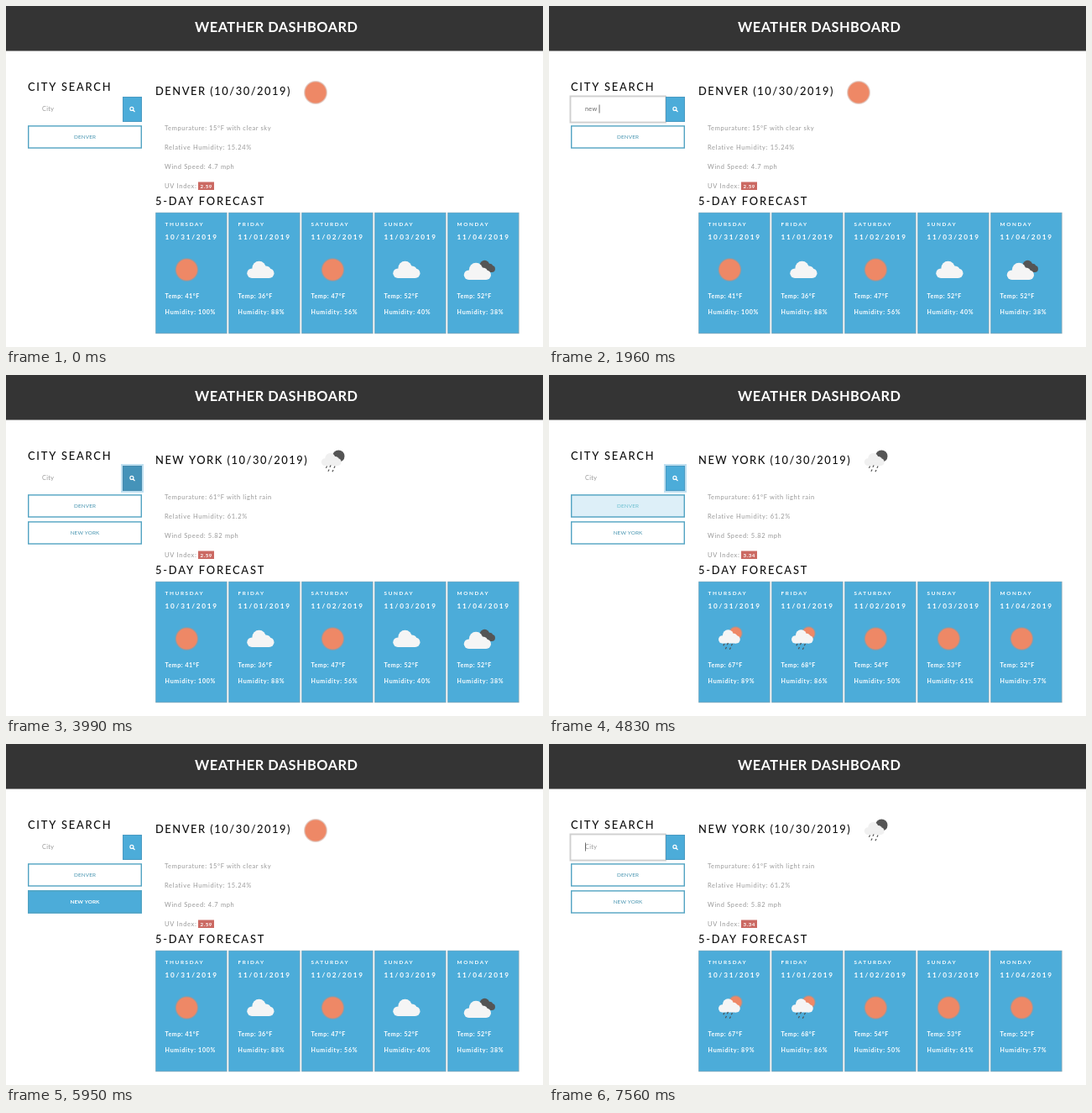
Animation, 640 px wide and 406 px high, one loop 7.84 s. Source, as an HTML page with a canvas:

```html
<!DOCTYPE html>
<html lang="en">
<head>
<meta charset="utf-8">
<title>Weather Dashboard</title>
<style>
html, body { margin: 0; width: 100%; height: 100%; overflow: hidden; background: #fff; }
canvas { display: block; width: 640px; height: 406px; }
</style>
</head>
<body>
<canvas id="stage"></canvas>
<script>
const W = 640, H = 406, LOOP = 7840;
const BLUE = '#4cacd9', LINE = '#52a3c2', CLOUD = '#f5f5f5', DARK = '#555';
const SUN = '#ee8866', SUN_CLEAR = 'rgba(170,140,130,0)';
const canvas = document.getElementById('stage');
const ctx = canvas.getContext('2d');
const dpr = window.devicePixelRatio || 1;
canvas.width = W * dpr;
canvas.height = H * dpr;
ctx.scale(dpr, dpr);

const DAYS = ['THURSDAY', 'FRIDAY', 'SATURDAY', 'SUNDAY', 'MONDAY'];
const CITIES = {
  denver: {
    title: 'DENVER (10/30/2019)', icon: 'sun', iconX: 369, uv: '2.59',
    lines: ['Tempurature: 15°F with clear sky', 'Relative Humidity: 15.24%', 'Wind Speed: 4.7 mph'],
    icons: ['sun', 'cloud', 'sun', 'cloud', 'broken'],
    temps: [41, 36, 47, 52, 52], humidity: [100, 88, 56, 40, 38]
  },
  newYork: {
    title: 'NEW YORK (10/30/2019)', icon: 'rain', iconX: 390, uv: '3.34',
    lines: ['Tempurature: 61°F with light rain', 'Relative Humidity: 61.2%', 'Wind Speed: 5.82 mph'],
    icons: ['sunRain', 'sunRain', 'sun', 'sun', 'sun'],
    temps: [67, 68, 54, 53, 52], humidity: [89, 86, 50, 61, 57]
  }
};

const QUERY = 'new york';
const KEYS = [1610, 1750, 1820, 1960, 2170, 2310, 2380, 2520];
const FOCUS = [[400, 3500], [6510, LOOP]];

const within = (t, a, b) => t >= a && t < b;
const ramp = (t, start, dur) => Math.min(1, Math.max(0, (t - start) / dur));
const pulse = (t, a, da, b, db) => ramp(t, a, da) - ramp(t, b, db);

function text(str, x, y, size, color, spacing = 0, weight = 400, align = 'left') {
  ctx.font = `${weight} ${size}px Lato, "Open Sans", sans-serif`;
  ctx.letterSpacing = spacing + 'px';
  ctx.textAlign = align;
  ctx.fillStyle = color;
  ctx.fillText(str, x, y);
  return ctx.measureText(str).width;
}

const heading = (str, x, y, spacing) => text(str, x, y, 12.9, '#111', spacing, 500);

function box(x, y, w, h, color) {
  ctx.fillStyle = color;
  ctx.fillRect(x, y, w, h);
}

function outline(x, y, w, h, color, width) {
  ctx.strokeStyle = color;
  ctx.lineWidth = width;
  ctx.strokeRect(x + width / 2, y + width / 2, w - width, h - width);
}

function disc(x, y, r, color) {
  ctx.fillStyle = color;
  ctx.beginPath();
  ctx.arc(x, y, r, 0, 7);
  ctx.fill();
}

function sun(x, y, r) {
  const glow = ctx.createRadialGradient(x, y, r - 1, x, y, r + 1.5);
  glow.addColorStop(0, SUN);
  glow.addColorStop(1, SUN_CLEAR);
  disc(x, y, r + 1.5, glow);
}

function cloud(x, y, s, color) {
  disc(x - 10.3 * s, y + 4.2 * s, 5.8 * s, color);
  disc(x - 1.8 * s, y - 2 * s, 8.2 * s, color);
  disc(x + 6.5 * s, y + 1.2 * s, 5.8 * s, color);
  disc(x + 10.3 * s, y + 4.2 * s, 5.8 * s, color);
  box(x - 10.3 * s, y + 3 * s, 20.6 * s, 7 * s, color);
}

function drops(x, y) {
  ctx.strokeStyle = '#505050';
  ctx.lineWidth = 1.2;
  ctx.beginPath();
  for (const [dx, dy] of [[-5, 1], [-.5, 0], [4.5, 1], [-2.5, 5], [2.5, 5.5]]) {
    ctx.moveTo(x + dx + .6, y + dy);
    ctx.lineTo(x + dx - .6, y + dy + 2.3);
  }
  ctx.stroke();
}

const ICONS = {
  sun(x, y) { sun(x, y, 13); },
  cloud(x, y) { cloud(x + 1, y, 1, CLOUD); },
  broken(x, y) {
    cloud(x + 8.3, y - 4, .7, DARK);
    cloud(x - 1.5, y + 2, 1, CLOUD);
  },
  rain(x, y) {
    disc(x + 6.3, y - 6.3, 7.2, DARK);
    cloud(x - 2.3, y - 2.5, .74, '#f0f0f0');
    drops(x - 3, y + 4.5);
  },
  sunRain(x, y) {
    sun(x + 7, y - 6.5, 7.5);
    cloud(x - .5, y - 2.5, .8, CLOUD);
    drops(x - 2, y + 5);
  }
};

function cityButton(label, y, fill, halo) {
  if (halo) box(24, y - 2, 140, 31.5, '#bfdff0');
  box(26, y, 136, 27.5, '#fff');
  ctx.globalAlpha = fill;
  box(26, y, 136, 27.5, BLUE);
  ctx.globalAlpha = 1;
  outline(26, y, 136, 27.5, LINE, 1.4);
  text(label, 94, y + 16, 6.4, fill > .5 ? '#fff' : fill > 0 ? '#6cbfd0' : '#4794b0',
    .1, fill > .5 ? 700 : 400, 'center');
}

function search(t) {
  const focus = FOCUS.find(([a, b]) => within(t, a, b));
  heading('CITY SEARCH', 26, 101.1, 1.75);

  if (focus) {
    ctx.globalAlpha = ramp(t, focus[0], 140);
    box(24.5, 106.5, 115.5, 33, '#cfcfcf');
    box(26.4, 108.4, 112, 29.2, '#fff');
    ctx.globalAlpha = 1;
  }

  const typed = t < 3640 ? QUERY.slice(0, KEYS.filter(k => k <= t).length) : '';
  const width = text(typed || 'City', 43, 125, 7.3, typed ? '#666' : '#999', .3);
  if (focus) {
    const last = Math.max(focus[0], ...KEYS.filter(k => k <= t && focus[0] < k));
    if ((t - last) % 1000 < 500) box(typed ? 43 + width : 43, 117.5, .7, 10, '#333');
  }

  if (within(t, 3500, 5250)) box(137, 106, 27, 34, '#bfdff0');
  box(139, 108, 23, 30, BLUE);
  ctx.globalAlpha = pulse(t, 3430, 150, 4270, 150);
  box(139, 108, 23, 30, '#4593b9');
  ctx.globalAlpha = 1;
  outline(139, 108, 23, 30, 'rgba(70,120,150,.35)', 1);
  ctx.strokeStyle = '#fff';
  ctx.lineWidth = 1.2;
  ctx.beginPath();
  ctx.arc(149.9, 122.4, 2, 0, 7);
  ctx.moveTo(151.5, 124);
  ctx.lineTo(153.5, 126);
  ctx.stroke();

  cityButton('DENVER', 142.2, pulse(t, 4780, 270, 5600, 210), within(t, 5250, 5810));
  if (t >= 3640) {
    cityButton('NEW YORK', 174.2, pulse(t, 5670, 210, 6440, 210), within(t, 5990, 6510));
  }
}

function current(city, uv) {
  heading(city.title, 178, 105.5, 1.52);
  ICONS[city.icon](city.iconX, 103);
  city.lines.forEach((line, i) => text(line, 189, 148 + i * 22.8, 7.5, '#999', i ? .66 : .58));
  text('UV Index:', 189, 216.6, 7.5, '#999', .68);
  box(229, 209.5, 19, 9.5, '#cb6962');
  text(uv, 238.7, 216.6, 6.2, '#fff', .5, 700, 'center');
}

function forecast(city) {
  heading('5-DAY FORECAST', 178, 236.9, 1.8);
  DAYS.forEach((day, i) => {
    const x = 178.2 + i * 87, tx = x + 11.4;
    box(x, 245.8, 85.4, 144.4, '#8fa9b5');
    box(x + .4, 246.3, 84.2, 143.2, BLUE);
    text(day, tx, 262.4, 6.4, '#fff', 1.6, 700);
    text(`${i ? '11/0' + i : '10/31'}/2019`, tx, 277.7, 8.2, '#fff', 1.75, 700);
    ICONS[city.icons[i]](x + 37.2, 314);
    text(`Temp: ${city.temps[i]}°F`, tx, 347.8, 7.1, '#fff', .52, 700);
    text(`Humidity: ${city.humidity[i]}%`, tx, 366.6, 7.1, '#fff', .66, 700);
  });
}

function draw(t) {
  const { denver, newYork } = CITIES;
  const now = within(t, 3710, 5390) || t >= 6020 ? newYork : denver;
  const next = within(t, 4410, 5460) || t >= 6090 ? newYork : denver;
  box(0, 0, W, H, '#fff');
  box(0, 0, W, 53.5, '#343434');
  text('WEATHER DASHBOARD', 322.3, 31, 16.4, '#fff', .47, 700, 'center');
  search(t);
  current(now, next.uv);
  forecast(next);
}

function tick() {
  draw(performance.now() % LOOP);
  requestAnimationFrame(tick);
}
tick();
</script>
</body>
</html>
```
